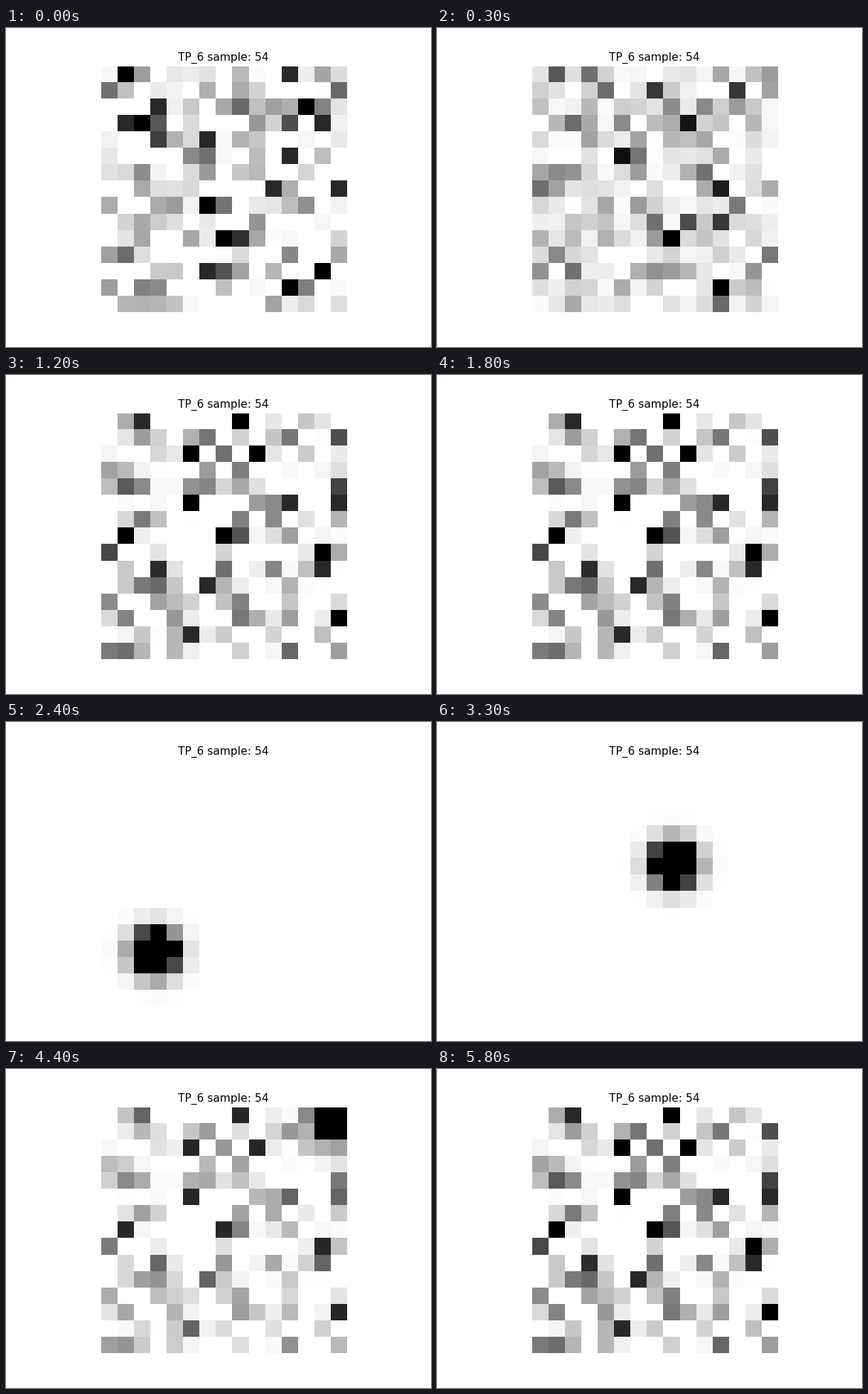
A matplotlib script that plays this animation: 598 px wide and 448 px high, repeating every 6300 ms.

```python
import numpy as np
import matplotlib.pyplot as plt
from matplotlib.animation import FuncAnimation

W, H, DPI = 598, 448, 100
SCALE = W / 640                  # text size relative to a 640 px wide figure
LEFT, TOP, SIDE = 133.5, 53.8, 345.4
N = 15
FRAMES, STEP_MS = 63, 100
FIRST_BUMP, LAST_BUMP = 16, 33   # states in which the bump travels
DECAY = 0.53

rows, cols = np.mgrid[0:N, 0:N]


def activity(seed, peaks):
    """Sparse random firing, exponential in strength, with given peak cells."""
    rng = np.random.default_rng(seed)
    ink = np.minimum(rng.exponential(70, (N, N)), 215)
    ink[rng.random((N, N)) < 0.4] = 0
    for cell in peaks:
        ink[cell] = 300
    return ink


def bump(t):
    """Gaussian bump on its way from bottom left to top right."""
    x = 0.5 + (N - 2) * t
    y = N - 1 - x
    return 723 * np.exp(-0.66 * ((cols - x) ** 2 + (rows - y) ** 2))


def mix(a, b, t):
    return a + (b - a) * min(max(t, 0), 1)


first = activity(3, [(0, 1), (2, 12), (3, 2), (8, 6), (10, 7), (12, 13),
                     (13, 11)])
second = activity(8, [(1, 7), (1, 12), (3, 9), (5, 5), (7, 11), (9, 11),
                      (10, 8), (13, 11)])
third = activity(21, [(0, 8), (2, 5), (2, 9), (5, 5), (7, 1), (7, 7),
                      (8, 13), (12, 14)])


def state(u):
    if u < 5:
        return mix(first, second, u / 3)
    if u < FIRST_BUMP:
        return mix(second, third, (u - 5) / 3)
    if u <= LAST_BUMP:
        return bump((u - FIRST_BUMP) / (LAST_BUMP - FIRST_BUMP))
    left = DECAY ** (u - LAST_BUMP)
    return third * (1 - left) + 2 * bump(1) * left


fig = plt.figure(figsize=(W / 100, H / 100), dpi=DPI, facecolor="white")
ax = fig.add_axes([LEFT / W, 1 - (TOP + SIDE) / H, SIDE / W, SIDE / H])
image = ax.imshow(first, cmap="gray_r", vmin=0, vmax=255,
                  interpolation="nearest")
ax.axis("off")
ax.set_title("TP_6 sample: 54", fontsize=12 * SCALE, pad=6 * SCALE,
             fontname="DejaVu Sans")


def draw(k):
    # Every fifth frame repeats the state before it.
    image.set_data(state(k - (k + 3) // 5))
    return [image]


anim = FuncAnimation(fig, draw, frames=FRAMES, interval=STEP_MS,
                     repeat=True, repeat_delay=0)
plt.show()
```
